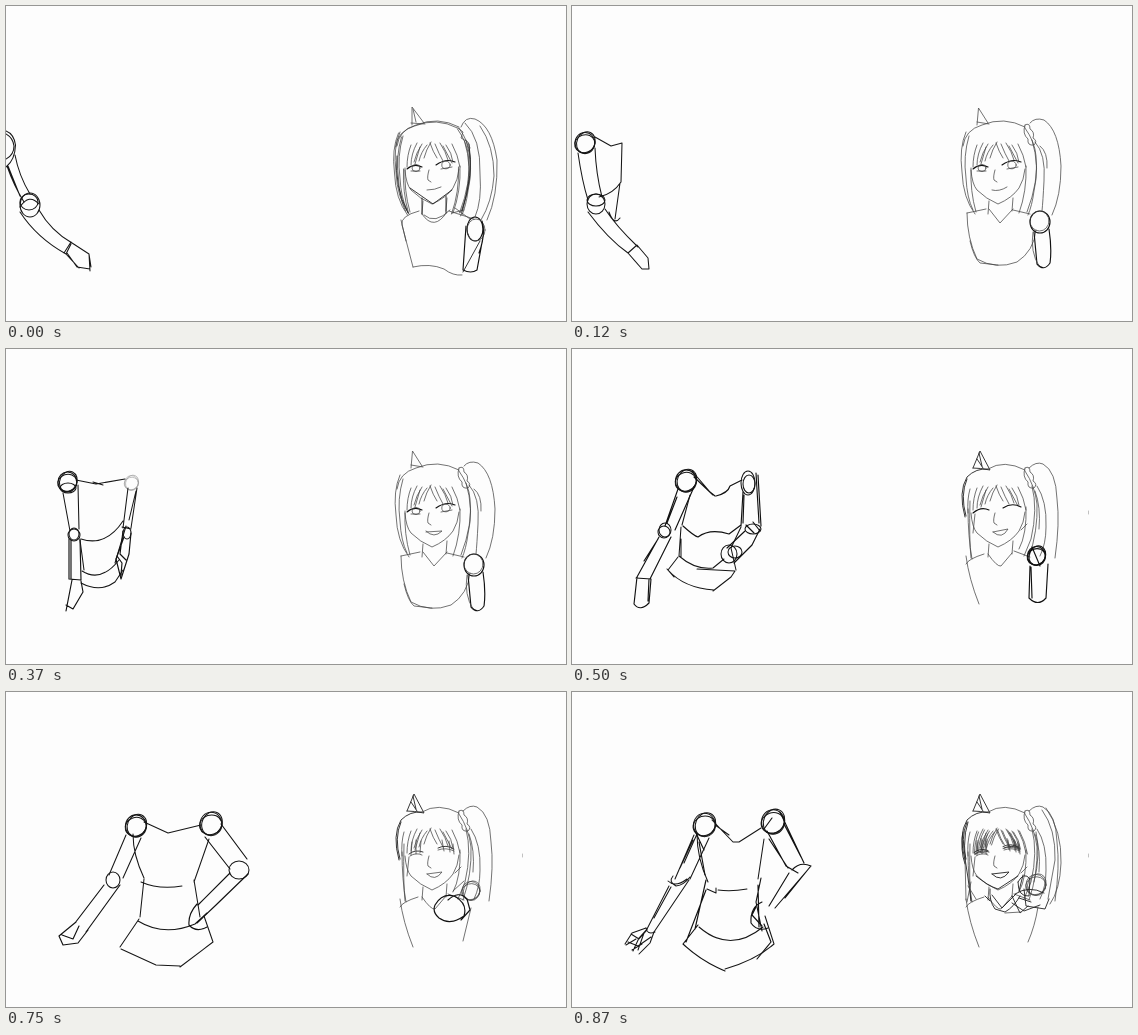
Write an HTML page that moves like this. It is 560 by 315 pixels and loops after 1000 ms.

```html
<!DOCTYPE html>
<html lang="en">
<head>
<meta charset="utf-8">
<title>Two sketches</title>
<style>
html, body { margin: 0; width: 100%; height: 100%; overflow: hidden; background: #fdfdfd; }
.stage { position: relative; width: 560px; height: 315px; overflow: hidden; }
.strip { position: absolute; left: 0; top: 0; animation: strip 1s step-end infinite; }
path, ellipse, circle { fill: none; stroke-linecap: round; stroke-linejoin: round; vector-effect: non-scaling-stroke; }
.body { stroke: #161616; stroke-width: 1.05; }
.girl { stroke: #444; stroke-width: .75; }
.bold { stroke: #111; stroke-width: 1.15; }
.dark { stroke: #222; stroke-width: .9; }
.faint { stroke: #999; stroke-width: .6; }
@keyframes strip {
  0% { transform: translateX(0); }
  12% { transform: translateX(-560px); }
  25% { transform: translateX(-1120px); }
  37% { transform: translateX(-1680px); }
  50% { transform: translateX(-2240px); }
  62% { transform: translateX(-2800px); }
  75% { transform: translateX(-3360px); }
  87% { transform: translateX(-3920px); }
}
</style>
</head>
<body>
<div class="stage">
<svg class="strip" width="4480" height="315" viewBox="0 0 4480 315">
<defs>
  <!-- loosely redrawn unit circle, scaled for each joint -->
  <g id="joint">
    <ellipse rx="1" ry="1.06"/>
    <ellipse cx=".06" cy="-.08" rx=".9" ry="1.1" transform="rotate(24)"/>
    <ellipse cx="-.05" cy=".06" rx="1.02" ry=".88" transform="rotate(-18)"/>
  </g>
  <g id="fringe">
    <path d="M405 139Q401 149 401 161M411 137Q405 148 405 159M416 138Q410 147 408 156M421 139Q415 146 413 155M425 136Q420 144 418 152M424 137Q427 146 431 152M429 138Q433 148 437 155M434 137Q440 146 442 154M440 139Q446 147 447 156M446 138Q452 149 454 161M414 141L409 158M437 140L446 157"/>
  </g>
  <g id="face">
    <path d="M399 164Q400 178 405 184Q414 193 426 198Q440 192 447 182Q452 174 453 163M423 164Q421 171 422 174L425 176"/>
    <path d="M417 195L416 208M441 192L440 205"/>
  </g>
  <g id="openEyes">
    <path class="bold" d="M401 163Q408 157 416 161M430 159Q440 152 449 156"/>
    <ellipse cx="410" cy="162" rx="4" ry="3.6"/>
    <ellipse cx="440" cy="159" rx="4.2" ry="3.8"/>
    <path d="M405 165L414 165M435 163L446 161"/>
  </g>
  <g id="hair">
    <path d="M391 140Q393 124 410 119Q432 110 453 121M394 126Q387 142 390 166Q391 192 403 208M397 130Q391 150 394 172Q395 192 401 204M399 162Q398 185 404 206"/>
    <path d="M453 122Q463 136 464 150Q467 175 455 206M460 134Q468 160 462 185Q460 200 456 209M454 160Q455 185 447 207"/>
  </g>
  <g id="bow">
    <path d="M453 119Q458 116 458 123Q463 126 461 132Q466 135 462 139Q455 140 456 133Q450 128 453 119"/>
  </g>
  <g id="calm">
    <use href="#fringe"/><use href="#face"/><use href="#openEyes"/><use href="#hair"/><use href="#bow"/>
    <path d="M405 119L406.500 102L416 117M405 116L417 118"/>
    <path d="M458 117Q463 111 472 114Q487 124 489 160Q489 190 480 209M463 136Q474 148 472 175Q471 195 470 205M468 140Q476 146 475 162"/>
    <path d="M395 207Q395 232 405 253Q424 264 445 256Q462 245 464 224M398 235Q402 252 408 257L426 259M395 207L414 203M417 203L428 217L441 203M441 204L458 208"/>
    <ellipse class="bold" cx="468" cy="216" rx="10" ry="11"/>
    <ellipse cx="467.500" cy="215" rx="9.500" ry="10"/>
    <path class="bold" d="M462 226L465 258Q472 266 478 257Q480 243 477 223"/>
    <path d="M461 226Q458 246 467 260"/>
  </g>
  <g id="merry">
    <use href="#fringe"/><use href="#face"/><use href="#bow"/>
    <path class="dark" d="M401 119L408 102L418 121Q408 119 401 119M405 110L411 119M407 104L410 117"/>
    <path class="dark" d="M393 168Q386 143 395 128Q404 119 416 120M394 167Q388 146 395 130"/>
    <path d="M416 120Q432 110 453 121M398 140Q395 150 396 164M396 160Q396 188 400 210M398 152Q397 190 399 209M403 165L401 184"/>
    <path d="M453 122Q463 137 465 155Q466 182 457 208M460 137Q466 160 459 190L452 207M454 158Q455 185 447 200M449 181L455 175"/>
    <path d="M457 119Q464 112 471 115Q484 122 485 150Q488 174 483 209M465 137Q475 152 474 178Q474 195 468 207M463 142Q469 158 467 180"/>
    <path d="M394 207Q397 230 407 255M394 215Q396 210 412 205M416 205Q425 218 429 217L440 204M442 202L458 208"/>
    <path class="faint" d="M516.500 162V165"/>
  </g>
  <g id="smileEyes">
    <path class="bold" d="M401 164Q409 157 417 161M431 159Q440 153 449 158"/>
  </g>
  <g id="heavyEyes">
    <path class="dark" d="M403 162Q409 157 417 160M432 156Q440 152 448 157"/>
    <path d="M404 164Q410 160 416 163M406 150L405 163M410 148L410 162M415 149L414 161M432 158Q440 155 448 159M436 148L438 159M443 149L444 160M447 152L448 162"/>
  </g>
</defs>

<g>
  <g class="body">
    <path d="M0 125Q8 128 9.500 139Q9 154 0 161M0 128Q7 132 8 140Q8 149 0 153M9 149Q13 170 24 188M1 160Q8 180 18 196M2 160L14 190"/>
    <ellipse cx="24" cy="199" rx="10" ry="12"/><ellipse cx="23" cy="196" rx="9" ry="8"/>
    <path d="M14 201Q23 187 33 198M14 206Q31 232 60 248M33 204Q45 225 66 237M58 247L65 236M63 235L83 248L85 261M61 247L71 261L84 263M65 238L60 248L73 262M83 248L84 265"/>
  </g>
  <g class="girl">
    <use href="#fringe"/><use href="#face"/><use href="#openEyes"/><use href="#hair"/>
    <use href="#hair" x="-1.500" y="1"/>
    <path d="M406 119V101L418 117M405 117L419 118M407 103L410 116M421 184Q429 184 435 181"/>
    <path class="dark" d="M391 150Q388 180 402 207M404 182L427 198L446 184M463 138Q468 168 456 205M416 192V208M440 190V207"/>
    <path d="M455 121Q459 110 469 113Q486 120 491 154Q492 190 481 214M459 117Q475 132 474 168Q476 195 469 211M474 120Q488 140 488 170Q486 196 475 214M452 122L457 126L455 132L462 136L464 142"/>
    <path d="M413 205Q394 210 396 219L407 261M395 214L400 235M416 208Q428 226 441 206M418 209Q429 219 444 204M443 205L468 213M407 261Q424 257 438 263Q447 270 456 269M446 207L458 204M449 202L464 213"/>
    <ellipse class="bold" cx="469" cy="223" rx="8" ry="12"/><ellipse cx="470" cy="224" rx="9" ry="11"/>
    <path class="bold" d="M460 220L457 264Q465 268 471 264L477 231M476 215Q480 228 473 247"/>
    <path class="dark" d="M457 266L474 235"/>
  </g>
</g>

<g transform="translate(560)">
  <g class="body">
    <use href="#joint" transform="translate(13 137) scale(10)"/>
    <path d="M6 147Q10 175 16 194M23 142Q24 168 30 191M23 131L39 140L50 137M50 137L49 176M27 191Q41 188 49 176M48 177L43 213"/>
    <ellipse cx="24" cy="198" rx="9" ry="10"/><ellipse cx="24" cy="194" rx="9" ry="6"/>
    <path d="M16 206Q36 233 56 247M33 203Q44 220 66 241M56 247L65 239L76 252L77 263L70 263L56 247M37 206Q42 220 48 212"/>
  </g>
  <g class="girl"><use href="#calm"/><path d="M420 184Q427 186 435 181"/></g>
</g>

<g transform="translate(1120)">
  <g class="body">
    <use href="#joint" transform="translate(26.500 136) scale(10)"/>
    <path d="M20 146L19 193M22 147L20 190M38 137L34 190M37 132L57 141L80 134M57 139L40 134M80 134L79 174M35 193Q58 191 77 174M79 174Q68 194 67 213L62 237M45 202Q46 219 57 221Q64 217 63 210"/>
    <ellipse cx="25" cy="199" rx="8" ry="10"/><ellipse cx="25" cy="195" rx="8" ry="6"/>
    <path class="bold" d="M17 207L50 245L67 264M33 201L53 231L68 250L68 263M17 190L15 205M50 246L57 238M55 246L68 263M69 211L74 219L72 230L62 238M70 213L70 228M74 219L81 234M66 223L75 227M63 235L74 229"/>
  </g>
  <g class="girl"><use href="#calm"/><path d="M420 184Q427 186 435 181L435 183"/></g>
</g>

<g transform="translate(1680)">
  <g class="body">
    <use href="#joint" transform="translate(61.500 133) scale(9.500)"/><ellipse cx="62" cy="139" rx="8" ry="5"/>
    <g class="faint"><use href="#joint" transform="translate(125.500 134) scale(7)"/></g>
    <path d="M70 131L90 135L119 130M87 133L97 136M57 144L64 182M72 136L73 180M122 139L117 179M131 139L125 179M130 142L123 171M75 190Q100 198 117 172M74 191L78 221M120 177L109 214M76 222Q95 234 113 211M75 234Q94 244 109 233L117 221"/>
    <circle cx="68" cy="186" r="6"/><ellipse cx="68" cy="185" rx="5" ry="6"/><ellipse cx="121" cy="184" rx="4" ry="6"/>
    <path class="bold" d="M63 190V230L75 231L74 190M65 191V230M66 231L60 262M60 256L67 260L77 243L75 232M118 188L110 210L115 230L123 205L125 184M111 207L116 214L115 226M117 182L114 205L120 211M116 178L125 180"/>
  </g>
  <g class="girl"><use href="#calm"/><path d="M420 182Q428 190 436 182L420 183"/></g>
</g>

<g transform="translate(2240)">
  <g class="body">
    <use href="#joint" transform="translate(114 132) scale(10.500)"/>
    <ellipse cx="176" cy="134" rx="7" ry="12"/><ellipse cx="177" cy="135" rx="6" ry="9"/>
    <path class="bold" d="M120 122L138 143L143 147M122 128L141 146M144 147Q156 144 158 137L170 131M106 140L93 177M105 148L95 174M122 138L103 181M111 177Q122 187 126 188Q138 179 157 185L169 176M171 143L169 177M172 146L171 174M186 126L189 177M184 124L187 174"/>
    <path d="M118 146L110 176M109 178L107 207Q123 221 141 219L152 210M109 190V208M106 208L96 221Q112 239 142 241M95 220L102 228M125 220L163 222L159 228L141 242M169 178L159 199L164 221"/>
    <circle cx="92" cy="183" r="6"/><ellipse cx="93" cy="181" rx="6" ry="7"/><ellipse cx="181" cy="180" rx="8" ry="5"/><ellipse cx="157" cy="205" rx="8" ry="9"/><ellipse cx="163" cy="203" rx="7" ry="6"/>
    <path class="bold" d="M87 188L65 228M99 188L78 230M64 229L79 230L77 254Q68 263 62 255L65 228M77 230L76 252M86 190L72 212M173 182L155 199M188 180L180 196L162 214M181 173L188 182M174 176L182 184"/>
  </g>
  <g class="girl"><use href="#merry"/><use href="#smileEyes"/>
    <path d="M421 183L436 180Q430 191 421 183"/>
    <g class="bold"><use href="#joint" transform="translate(464.500 207) scale(9)"/>
    <path d="M458 217L457 249Q466 258 474 249L476 215M459 218L460 249M460 198L468 217"/></g>
  </g>
</g>

<g transform="translate(2800)">
  <g class="body">
    <use href="#joint" transform="translate(127 134) scale(10)"/>
    <use href="#joint" transform="translate(209 133) scale(11)"/>
    <path d="M135 131Q165 133 201 129M204 225L209 215M203 181L201 213M200 222L207 245"/>
    <path class="bold" d="M117 143L101 180M115 146L106 168M133 147L126 165L114 184M130 137L141 184M131 138L134 158M141 181Q148 190 169 193M173 190Q200 188 204 174L210 138M139 181L143 220M141 183L143 204M140 220Q133 235 119 256M140 220L166 235M170 235Q190 230 206 215M204 222L210 248L187 271M121 251L142 266M128 259L178 270"/>
    <use href="#joint" transform="translate(105.500 189) scale(6.500)"/>
    <use href="#joint" transform="translate(240 179) scale(11)"/>
    <path class="bold" d="M101 197L64 222M100 194Q88 213 68 222M112 194Q104 218 79 240M110 199Q104 215 90 228M64 222L47 238L54 246L74 247L84 233M52 231Q58 241 72 234L81 232M50 244L60 226M62 234L76 228M205 137L234 169M205 145L229 172M216 120L248 159M215 126L236 148M249 159L251 185M232 177Q220 190 192 209L190 214M251 185Q241 202 216 212Q203 219 194 230M190 214L199 234M193 223Q180 230 179 236Q190 244 203 237"/>
  </g>
  <g class="girl"><use href="#merry"/><use href="#heavyEyes"/>
    <path class="dark" d="M420 182L437 180Q429 194 420 182"/>
    <use href="#joint" transform="translate(466 200) scale(8.500)"/>
    <g class="bold"><use href="#joint" transform="translate(454 219) scale(8)"/>
    <path d="M412 231L419 221L430 219L440 221L450 235L445 246L437 252L424 249L414 239L412 231M415 225L414 237L422 249L434 254M417 223L428 222M441 223L451 232L448 242M410 226L418 225"/></g>
    <path class="dark" d="M443 213L459 195M465 211L459 230L448 231M441 251L456 236M455 209L463 206"/>
  </g>
</g>

<g transform="translate(3360)">
  <g class="body">
    <use href="#joint" transform="translate(130 134) scale(10.500)"/>
    <use href="#joint" transform="translate(205 132) scale(11)"/>
    <path d="M138 130L162 141L195 133M120 143L103 183M135 146L117 186M127 142Q127 163 138 186M135 190Q153 198 176 194M203 147L188 190M138 187L134 225M188 188L194 225M133 227L114 255M132 229Q158 245 189 232L201 221M198 224L207 250L174 275M115 257L150 273L174 274"/>
    <ellipse cx="107" cy="188" rx="7" ry="8"/><ellipse cx="233" cy="178" rx="10" ry="9"/>
    <path class="bold" d="M98 193L69 231M114 193L80 240M70 230L53 244L57 253L72 251L82 238M56 243L67 247L73 234M199 145L224 177M215 132L241 167M242 182L210 213L191 231M224 181L192 213M191 212Q182 222 183 233Q190 241 201 235"/>
  </g>
  <g class="girl"><use href="#merry"/><use href="#heavyEyes"/>
    <path d="M421 182L436 180Q429 190 421 182"/>
    <use href="#joint" transform="translate(465 199) scale(9)"/>
    <path class="bold" d="M429 213Q436 201 448 204Q462 211 458 224Q444 234 433 226Q426 220 429 213M442 208Q453 198 461 207L464 218L455 228"/>
    <path d="M465 216L457 249M447 199L458 189"/>
  </g>
</g>

<g transform="translate(3920)">
  <g class="body">
    <use href="#joint" transform="translate(132.500 133) scale(11)"/>
    <use href="#joint" transform="translate(201 130) scale(11.500)"/>
    <path d="M140 128L161 150L167 150L189 136M143 133L157 143M122 143L103 187M121 148L108 176M125 142L112 171M137 146L118 187M125 142Q125 166 136 190M135 197L144 201V196M146 198Q159 200 175 197M192 147L186 187M127 235Q158 262 191 235M153 277Q184 268 202 252L193 224"/>
    <path class="bold" d="M123 139L132 158M127 150L133 183M134 188L123 237M134 198L114 250M189 186L184 210L190 239M186 193L187 235M126 233L111 252Q129 269 153 279M192 232L199 250L185 267"/>
    <path d="M96 189Q103 196 115 187M101 184Q96 190 104 194Q112 193 118 185M97 194L75 237M117 188L82 240M99 195L82 226M74 236Q75 243 83 240"/>
    <path d="M74 236L60 241L53 252M75 237L67 246L61 259M82 240L78 251L67 262M59 242L67 247L75 238M56 250L66 254L79 245M54 253L64 247M60 258L70 252M72 241L66 258"/>
    <path class="bold" d="M195 139L214 174M197 147L216 176M208 120L232 171M212 132L229 165M192 137L200 126M214 174L226 181M220 178Q228 169 239 174L203 216M217 181L197 214M238 175L213 206M190 210Q178 215 179 231Q185 240 196 236M184 215L180 223L190 234"/>
  </g>
  <g class="girl"><use href="#merry"/><use href="#heavyEyes"/>
    <use href="#fringe" x="1.500" y="1"/><use href="#heavyEyes" x="-1" y="-1.500"/>
    <path class="dark" d="M420 182L437 180Q429 191 420 182M404 184Q416 194 426 197L446 184M391 140Q388 158 393 172M396 130Q389 150 396 186L399 209"/>
    <path d="M474 116Q490 139 489 171Q488 198 478 212M470 118Q484 137 483 168L476 207M393 165L394 208M399 190L395 210M396 194L404 207M464 140Q469 162 462 190"/>
    <path class="dark" d="M418 197Q417 209 423 217L433 220Q442 215 448 204M420 203L430 216L444 202M440 204L448 221L456 214M418 209L413 204"/>
    <use href="#joint" transform="translate(464 193) scale(10)"/>
    <path class="dark" d="M446 190Q452 179 458 187L457 204Q446 205 446 190M452 197L454 214L473 217L477 207M443 202Q457 193 472 201M440 211L452 219L468 213M447 206L459 210M451 183L447 199"/>
    <path d="M466 215Q463 234 456 250M433 221L449 220"/>
  </g>
</g>
</svg>
</div>
</body>
</html>
```
